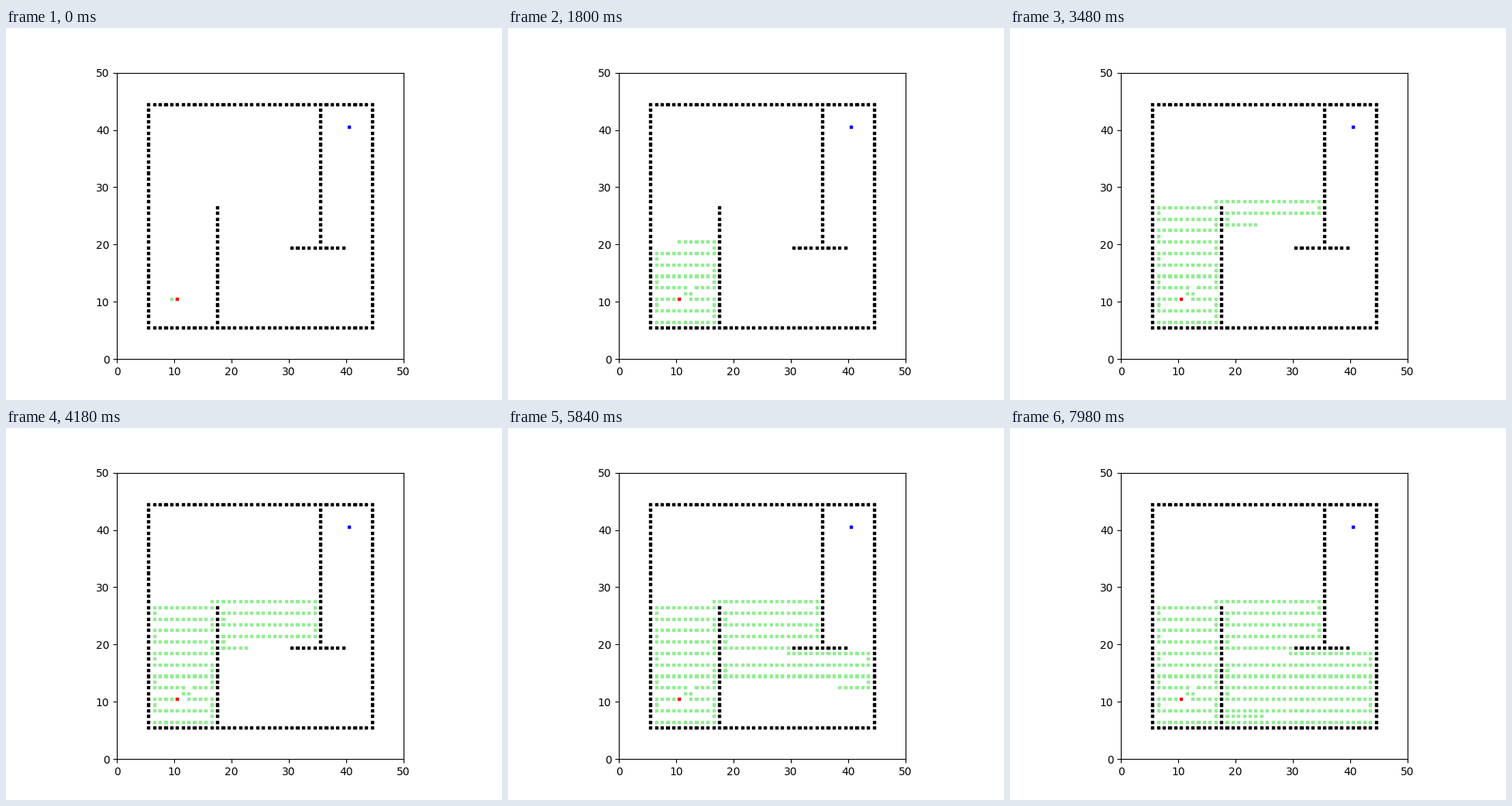
These frames come from a looping animation (640x480 px, 8 s). A matplotlib script:

```python
import matplotlib.pyplot as plt
import numpy as np
from matplotlib.animation import FuncAnimation

FRAMES = 400
START, GOAL = (10, 10), (40, 40)
MOVES = [(0, 1), (0, -1), (1, 0), (-1, 0)]  # the last one pushed is tried first


def build_walls():
    cells = set()
    for i in range(5, 45):
        cells |= {(i, 5), (i, 44), (5, i), (44, i)}
    cells |= {(17, y) for y in range(5, 27)}
    cells |= {(35, y) for y in range(19, 45)}
    cells |= {(x, 19) for x in range(30, 40)}
    return cells


def depth_first(walls, count):
    """Return the first cells visited; neighbours are marked once pushed."""
    stack, seen, order = [START], {START}, []
    while stack and len(order) < count:
        x, y = stack.pop()
        order.append((x, y))
        for dx, dy in MOVES:
            cell = (x + dx, y + dy)
            if cell not in walls and cell not in seen:
                seen.add(cell)
                stack.append(cell)
    return order


walls = build_walls()
visited = depth_first(walls, FRAMES + 1)[1:]
fixed = sorted(walls) + [START, GOAL]
centers = np.array(fixed + visited) + 0.5
colors = ["black"] * len(walls) + ["red", "blue"] + ["lightgreen"] * FRAMES

fig, ax = plt.subplots(figsize=(6.4, 4.8), dpi=100)
ax.set_aspect("equal")
ax.set_xlim(0, 50)
ax.set_ylim(0, 50)
ax.set_xticks(range(0, 51, 10))
ax.set_yticks(range(0, 51, 10))

squares = ax.scatter(centers[:, 0], centers[:, 1], s=5, c=colors, marker="s")


def draw(frame):
    shown = len(fixed) + frame + 1
    squares.set_offsets(centers[:shown])
    squares.set_facecolor(colors[:shown])
    return [squares]


def reset():
    return draw(0)


anim = FuncAnimation(fig, draw, frames=FRAMES, init_func=reset,
                     interval=20, repeat=True, repeat_delay=0)
plt.show()
```
